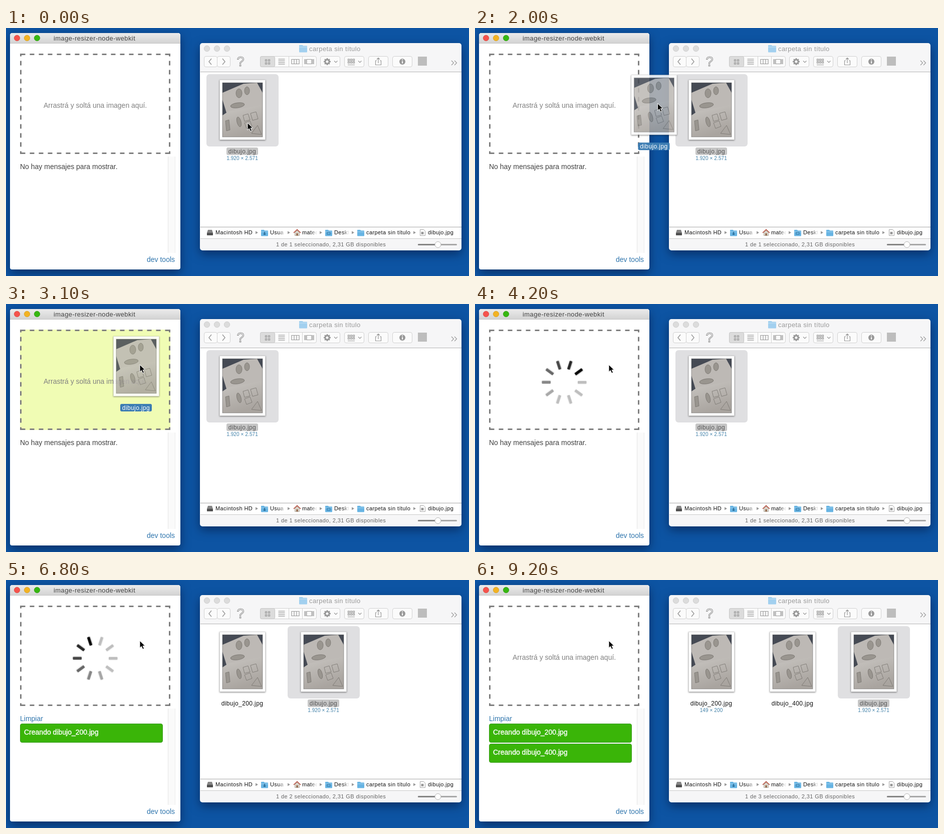
Recreate the animation shown at these times as an HTML page. Size 924 by 494 pixels, loop 9600 ms.

```html
<!DOCTYPE html>
<html lang="es">
<head>
<meta charset="utf-8">
<title>image-resizer-node-webkit</title>
<style>
html, body { margin: 0; width: 100%; height: 100%; overflow: hidden; background: #0d54a3; }
svg { display: block; width: 924px; height: 494px; }
text { font-family: "Liberation Sans", Arial, sans-serif; white-space: pre; }
.app { font-size: 14px; }
.title { font-size: 13px; letter-spacing: .4px; }
.label { font-size: 12px; letter-spacing: .4px; text-anchor: middle; }
.size { font-size: 10px; letter-spacing: .1px; text-anchor: middle; fill: #4080a8; }
.small { font-size: 11px; letter-spacing: .42px; }
.link { fill: #2f75ad; }
.window { filter: drop-shadow(0 7px 10px rgba(0, 10, 40, .5)); }
.paper { filter: drop-shadow(0 1px 1.5px rgba(0, 0, 0, .5)); }
.btn { fill: #fbfbfb; stroke: #d2d2d2; }
.ico { fill: none; stroke: #999; stroke-width: 1.2; }
.solid { fill: #999; }
.spoke { filter: drop-shadow(0 1px 1px rgba(0, 0, 0, .3)); }
.msg text { fill: #fff; stroke: #fff; stroke-width: .35px; }
</style>
</head>
<body>
<svg id="stage" viewBox="0 0 924 494" xmlns="http://www.w3.org/2000/svg"></svg>
<script>
const LOOP = 9600, STEP = 100;
const GRAB = 1200, DROP = 3400, FILE_200 = 5000, MSG_200 = 6300,
      FILE_400 = 7400, DONE = 8500, SIZE_200 = 9200;
const SLOT = 162, SLIDE = 300;

// time, x, y of the pointer
const PATH = [
  [0, 482, 189], [600, 479, 160], [GRAB, 479, 160],
  [1500, 467, 159], [2400, 291, 144], [2900, 267, 121]
];

const range = n => [...Array(n).keys()];
const rect = (x, y, w, h, attrs = '') =>
  `<rect x="${x}" y="${y}" width="${w}" height="${h}" ${attrs}/>`;
const text = (x, y, cls, str, fill = '#333', id = '') =>
  `<text x="${x}" y="${y}" class="${cls}" ${cls.includes('link') ? '' : `fill="${fill}"`} ${id && `id="${id}"`}>${str}</text>`;
const dot = (x, y, r, attrs) => `<circle cx="${x}" cy="${y}" r="${r}" ${attrs}/>`;
const path = (d, cls = 'ico', attrs = '') => `<path d="${d}" class="${cls}" ${attrs}/>`;
const button = (x, w) => rect(x + .5, 56.5, w, 21, 'rx="3.5" class="btn"');
const folder = (x, y, w, h, color) =>
  `<path d="M${x} ${y + 1}q0-1 1-1h${w * .35}l1.5 1.5h${w * .65 - 3.5}q1 0 1 1v${h - 3}q0 1-1 1h${2 - w}q-1 0-1-1z" fill="${color}"/>` +
  rect(x, y + 3.5, w, 1, 'fill="#fff" opacity=".4"');

const defs = `<defs>
  <linearGradient id="bar" x2="0" y2="1"><stop stop-color="#ebebeb"/><stop offset="1" stop-color="#d2d2d2"/></linearGradient>
  <linearGradient id="sheet" x2=".4" y2="1"><stop stop-color="#c9c6c2"/><stop offset="1" stop-color="#a9a49f"/></linearGradient>
  <linearGradient id="fade"><stop stop-color="#fff" stop-opacity="0"/><stop offset="1" stop-color="#fff"/></linearGradient>
  <g id="thumb">
    <rect x="426.5" y="103.5" width="91" height="119" fill="#fff" stroke="#d0d0d0" stroke-width=".6" class="paper"/>
    <svg x="432" y="109" width="80" height="108">
      <rect width="80" height="108" fill="#454a54"/>
      <path d="M0 20L42 2 69 0 80 20V52L8 60 0 34z" fill="#bdb9b5"/>
      <path d="M0 65L12 57 80 44V108H0z" fill="url(#sheet)"/>
      <g fill="#99958f" stroke="#77736e" stroke-width=".8">
        <ellipse cx="33" cy="21" rx="6" ry="9"/>
        <ellipse cx="49" cy="16" rx="5" ry="8"/>
        <ellipse cx="30" cy="45" rx="14" ry="5" transform="rotate(-8 30 45)"/>
        <ellipse cx="33" cy="78" rx="4" ry="10" transform="rotate(-15 33 78)"/>
        <path d="M6 76l7-2 2 20-7 2z"/>
        <path fill="none" d="M41 65l10-3 4 12-11 3zM56 61l11-3 4 14-11 3zM44 80l11-4 4 11-11 4zM58 101l12-16 8 18z"/>
      </g>
    </svg>
    <rect x="432" y="109" width="80" height="108" fill="none" stroke="#555" stroke-opacity=".5"/>
  </g>
</defs>`;

const dashes = () => {
  const line = (d, off) => path(d, '', `fill="none" stroke="#808080" stroke-width="3" stroke-dasharray="9" stroke-dashoffset="${off}"`);
  const corners = [[28, 51], [325, 51], [28, 248], [325, 248]]
    .map(([x, y]) => rect(x, y, 3, 3, 'fill="#808080"')).join('');
  return line('M31 52.5H325', 1.5) + line('M31 249.5H325', 1.5) +
         line('M29.5 54V248', 6.5) + line('M326.5 54V248', 6.5) + corners;
};

const message = (id, y, name) =>
  `<g id="${id}" class="msg">${rect(28.5, y + .5, 284, 37, 'rx="3.5" fill="#3ab508" stroke="#3a9c1c"')}` +
  text(36, y + 22, 'app', 'Creando ' + name, '#fff') + '</g>';

const spinner = `<g id="spinner" transform="translate(178 156)">` +
  range(10).map(k => rect(27, -2.7, 17.5, 5.4, `rx="1.2" class="spoke" transform="rotate(${k * 36})"`)).join('') + '</g>';

const resizer = `<g><path class="window" d="M8 481V15q0-5 5-5H343q5 0 5 5V477q0 4-4 4H12q-4 0-4-4z" fill="#fff"/>
  <path d="M8 31V15q0-5 5-5H343q5 0 5 5V31z" fill="url(#bar)"/>` +
  rect(8, 30, 340, 1, 'fill="#c4c4c4"') +
  dot(22, 20, 5.7, 'fill="#f5534c" stroke="#d9443e" stroke-width=".7"') +
  dot(42, 20, 5.7, 'fill="#f2b324" stroke="#d39a1c" stroke-width=".7"') +
  dot(62, 20, 5.7, 'fill="#37b711" stroke="#2a9a0d" stroke-width=".7"') +
  text(95, 25, 'title', 'image-resizer-node-webkit', '#444') +
  rect(28, 51, 300, 200, 'id="zone"') + dashes() +
  text(75, 159, 'app', 'Arrastrá y soltá una imagen aquí.', '#808080', 'hint') + spinner +
  rect(323, 256, 15, 192, 'fill="#fafafa"') +
  rect(323, 256, 1, 192, 'fill="#e6e6e6"') + rect(337, 256, 1, 192, 'fill="#ececec"') +
  text(28, 281, 'app', 'No hay mensajes para mostrar.', '#404040', 'empty') +
  text(28, 281, 'app link', 'Limpiar', '', 'clear') +
  message('msg200', 286, 'dibujo_200.jpg') + message('msg400', 326, 'dibujo_400.jpg') +
  text(281, 466, 'app link', 'dev tools') + '</g>';

const grid = (x, y, n, s, gap) => range(n * 2)
  .map(i => rect(x + i % n * gap, y + (i / n | 0) * gap, s, s, 'class="ico"')).join('');
const rows = (x, y) => range(4).map(i => rect(x, y + i * 3.3, 13, 1.2, 'class="solid"')).join('');
const gear = `<g transform="translate(641 67)">` + dot(0, 0, 4, 'fill="none" stroke="#999" stroke-width="3"') +
  range(8).map(i => rect(-1.3, -7, 2.6, 3, `class="solid" transform="rotate(${i * 45})"`)).join('') + '</g>';

const toolbar = button(395, 26) + button(421, 26) +
  path('M410 61l-5 6 5 6M432 61l5 6-5 6', 'ico', 'style="stroke-width:1.5"') +
  `<text x="468" y="76" text-anchor="middle" font-size="27" fill="#f6f6f6" stroke="#8c8c8c" stroke-width="1">?</text>` +
  button(507, 112) + rect(507.5, 56.5, 29, 21, 'rx="3" fill="#dcdcdc" stroke="#c6c6c6"') +
  path('M564.5 57V78M591.5 57V78', 'btn') +
  grid(517.5, 63, 2, 3, 6) + rows(543.5, 61.5) +
  path('M570 62.5h15v9h-15zM575 62.5v9M580 62.5v9') +
  path('M600 62.5h10v9h-10zM596 62v10M598 62v10M612 62v10M614 62v10') +
  button(627, 39) + gear + path('M655 65.5l3.2 3.2 3.2-3.2') +
  button(675, 39) + grid(682.5, 62, 3, 3, 5) + path('M682 73.5h14M703 65.5l3.2 3.2 3.2-3.2') +
  button(723, 39) + path('M740 65h-2.5v8.5h11V65H746M743 70V59.5M740 62.5l3-3 3 3') +
  button(771, 39) + dot(791, 67, 6, 'class="solid"') +
  rect(790.1, 66, 2, 4.5, 'fill="#fff"') + dot(791.1, 63.6, 1.1, 'fill="#fff"') +
  rect(822, 57, 18, 18, 'fill="#bdbdbd"') +
  path('M889 65l4.5 4.5-4.5 4.5M895 65l4.5 4.5-4.5 4.5');

// x, name, whether the name is cut off
const crumbs = [[418, 'Macintosh HD'], [527, 'Usua', 1], [591, 'mateo', 1], [655, 'Deskt', 1],
                [719, 'carpeta sin título'], [842, 'dibujo.jpg']];
const pathBar = crumbs.map(([x, name, cut]) => text(x, 411, 'small', name, '#111') +
    (cut ? rect(x + 17, 400, 13, 15, 'fill="url(#fade)"') + rect(x + 30, 400, 4, 15, 'fill="#fff"') : '')).join('') +
  [498, 562, 626, 690, 813].map(x => path(`M${x} 404.5l5 3-5 3z`, '', 'fill="#999"')).join('') +
  path('M403 402h8l2 6v5h-12v-5z', '', 'fill="#858585"') + rect(401, 408, 12, 5, 'rx="1" fill="#505050"') +
  [509, 637, 701].map(x => folder(x, 402, 14, 12, '#67b4e3')).join('') +
  dot(516, 407.5, 1.4, 'fill="#31739e"') + rect(514, 409, 4, 3, 'fill="#31739e"') +
  rect(641, 407, 6, 4, 'fill="none" stroke="#31739e"') +
  path('M576.5 407v6.5h9V407l-4.5-4z', '', 'fill="#d9d3c8" stroke="#8d8378" stroke-width=".6"') +
  path('M574 408l7-6.5 7 6.5', '', 'fill="none" stroke="#b64b3b" stroke-width="1.6"') +
  rect(579.5, 409, 3, 4.5, 'fill="#8d6042"') +
  path('M826.5 401.5h7l3 3v9h-10z', '', 'fill="#fff" stroke="#a5a5a5"') +
  rect(828.5, 406, 5, 5, 'fill="#999"');

const file = (id, name, size, selected) => `<g id="${id}">` +
  (selected ? rect(400, 92, 144, 144, 'rx="6" fill="#dfdfe1"') : '') + '<use href="#thumb"/>' +
  (selected ? rect(440, 238, 63, 15, 'rx="3" fill="#c6c6c6"') : '') +
  text(471.5, 250, 'label', name, selected ? '#555' : '#111') +
  (size ? text(471.5, 263, 'size', size, '#4080a8', id + 'Size') : '') + '</g>';

const finder = `<g><rect class="window" x="387" y="30" width="522" height="413" rx="5" fill="#f6f6f7"/>` +
  [401, 421, 441].map(x => dot(x, 41, 5.7, 'fill="#dcdcdc" stroke="#cacaca" stroke-width=".8"')).join('') +
  folder(585, 34, 16, 14, '#a2d0ef') + text(605, 46, 'title', 'carpeta sin título', '#999') + toolbar +
  rect(388, 87, 521, 1, 'fill="#b4b4b4"') + rect(388, 88, 521, 331, 'fill="#fff"') +
  rect(389.5, 89.5, 518, 305, 'id="ring" fill="none" stroke="#a9d6f1" stroke-width="3"') +
  file('f200', 'dibujo_200.jpg', '149 × 200') + file('f400', 'dibujo_400.jpg') +
  file('main', 'dibujo.jpg', '1.920 × 2.571', true) +
  rect(388, 396, 521, 1, 'fill="#a6a6a6"') + pathBar +
  rect(388, 419, 521, 1, 'fill="#c9c9c9"') +
  text(539, 435, 'small', '', '#666', 'status') +
  rect(822, 430, 78, 3, 'rx="1.5" fill="#a8a8a8"') + rect(822, 430, 36, 3, 'rx="1.5" fill="#858585"') +
  dot(862, 431.5, 6, 'fill="#fff" stroke="#b5b5b5"') + '</g>';

const drag = `<g id="drag"><use href="#thumb" opacity=".87"/>` +
  rect(440, 238, 63, 15, 'rx="3" fill="#3d7db3"') + text(471.5, 250, 'label', 'dibujo.jpg', '#fff') + '</g>';
const pointer = path('M0 0V14.3L3.4 11.2 5.9 16.8 8.5 15.6 6.1 10.2H10.6z', '',
  'id="pointer" fill="#000" stroke="#fff" stroke-width="1" stroke-linejoin="round"');

const stage = document.getElementById('stage');
stage.innerHTML = defs + rect(0, 0, 924, 494, 'fill="#0d54a3"') + resizer + finder + drag + pointer;

const ui = {};
stage.querySelectorAll('[id]').forEach(e => ui[e.id] = e);
const spokes = [...ui.spinner.children];

const show = (el, on) => el.style.display = on ? '' : 'none';
const move = (el, x, y) => el.setAttribute('transform', `translate(${x} ${y})`);
const ease = p => p * p * (3 - 2 * p);
const ramp = (t, from, len) => ease(Math.min(1, Math.max(0, (t - from) / len)));

function pointerAt(t) {
  const i = PATH.findIndex(p => p[0] > t);
  if (i < 0) return PATH[PATH.length - 1].slice(1);
  const [t0, x0, y0] = PATH[i - 1], [t1, x1, y1] = PATH[i];
  const p = ease((t - t0) / (t1 - t0));
  return [x0 + (x1 - x0) * p, y0 + (y1 - y0) * p];
}

function draw(t) {
  const [x, y] = pointerAt(t);
  const dragging = t >= GRAB && t < DROP;
  const busy = t >= DROP && t < DONE;

  move(ui.pointer, x, y);
  move(ui.drag, x - 479, y - 160);
  show(ui.drag, dragging);
  show(ui.ring, dragging && x > 387);
  ui.zone.setAttribute('fill', dragging && x < 328 ? '#f0fcb4' : '#fff');

  show(ui.hint, !busy);
  show(ui.spinner, busy);
  const head = 9.3 + (t - 4200) * .01075;
  spokes.forEach((s, k) => {
    const age = ((head - k) % 10 + 10) % 10 / 10;
    s.setAttribute('opacity', Math.max(.25, 1 - .75 * age / .6));
  });

  show(ui.empty, t < MSG_200);
  show(ui.clear, t >= MSG_200);
  show(ui.msg200, t >= MSG_200);
  show(ui.msg400, t >= DONE);

  show(ui.f200, t >= FILE_200);
  show(ui.f200Size, t >= SIZE_200);
  show(ui.f400, t >= FILE_400);
  move(ui.f400, SLOT, 0);
  move(ui.main, SLOT * (ramp(t, FILE_200, SLIDE) + ramp(t, FILE_400, SLIDE)), 0);
  const count = 1 + (t >= FILE_200) + (t >= FILE_400);
  ui.status.textContent = `1 de ${count} seleccionado, 2,31 GB disponibles`;
}

const start = performance.now();
function tick() {
  const t = (performance.now() - start) % LOOP;
  draw(Math.floor(t / STEP) * STEP);
  requestAnimationFrame(tick);
}
tick();
</script>
</body>
</html>
```
